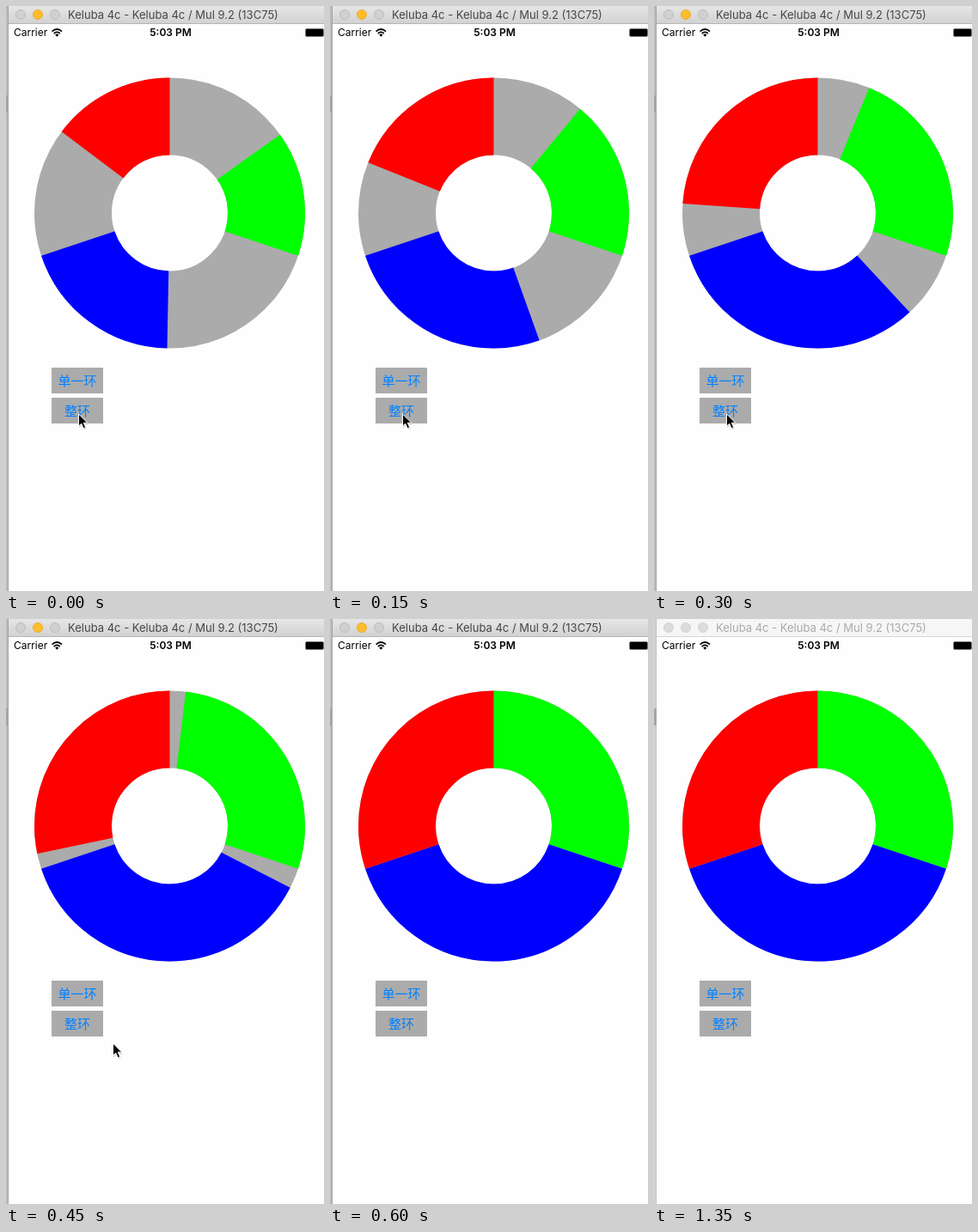
Animation of 370x681 px, one loop 1430 ms. Source, as an HTML page:

```html
<!DOCTYPE html>
<html lang="en">
<head>
<meta charset="utf-8">
<title>Ring chart</title>
<style>
  html, body { margin: 0; width: 100%; height: 100%; overflow: hidden; background: #fefefe; }
  svg { display: block; }
  text { font-family: Inter, Roboto, sans-serif; }
  .label { font: 15px "Noto Sans CJK SC", "Noto Sans CJK", sans-serif; fill: #0080ff; text-anchor: middle; }
  .ring circle { fill: none; stroke-width: 90; }
  .side { fill: #bcbcbc; }
  .edge { fill: #a2a2a2; }
  .bar { fill: url(#barFill); }
  .line { fill: #b6b6b6; }
  .title { font-size: 13px; fill: #464646; }
  .light { fill: #d0d0d0; stroke: #bcbcbc; }
  .amber { fill: #ffbd2e; stroke: #e9ab30; }
  .idle .side { fill: #d3d3d3; }
  .idle .edge { fill: #bdbdbd; }
  .idle .bar { fill: #f6f6f6; }
  .idle .line { fill: #d6d6d6; }
  .idle .title { fill: #a9a9a9; }
  .idle .light { fill: #dcdcdc; stroke: #d2d2d2; }
</style>
</head>
<body>
<svg id="stage" width="370" height="681" viewBox="0 0 370 681">
  <defs>
    <linearGradient id="barFill" x2="0" y2="1">
      <stop stop-color="#e6e6e6"/>
      <stop offset="1" stop-color="#d2d2d2"/>
    </linearGradient>
  </defs>

  <rect width="370" height="681" fill="#fefefe"/>
  <rect class="side" width="2" height="681"/>
  <rect class="edge" x="2" width="1" height="681"/>
  <rect y="104" width="3" height="20" fill="#a6a6a6"/>

  <rect class="bar" x="3" width="367" height="20"/>
  <rect class="line" x="3" y="20" width="367" height="1"/>
  <circle class="light" cx="17" cy="10" r="5.5"/>
  <circle class="light amber" id="amber" cx="37" cy="10" r="5.5"/>
  <circle class="light" cx="57" cy="10" r="5.5"/>
  <text class="title" x="72" y="15">Keluba 4c - Keluba 4c / Mul 9.2 (13C75)</text>

  <text x="9" y="35" font-size="12">Carrier</text>
  <g fill="none" stroke="#000" stroke-width="1.7">
    <path d="M53.6 29.6Q59.3 24.4 65 29.6"/>
    <path d="M55.8 32Q59.3 28.8 62.8 32"/>
  </g>
  <path d="M57.2 33.4Q59.3 31.7 61.4 33.4L59.3 35.7Z"/>
  <text x="191.5" y="35" font-size="12" font-weight="600" text-anchor="middle">5:03 PM</text>
  <rect x="348.5" y="26.5" width="21" height="9" rx="1.5" fill="#000" stroke="#777"/>

  <g class="ring" transform="translate(190.5 241) rotate(-90)">
    <circle r="112.5" stroke="#ababab"/>
    <g id="arcs"></g>
  </g>

  <rect x="53" y="421" width="60" height="30" fill="#ababab"/>
  <text class="label" lang="zh-CN" x="83" y="442">单一环</text>
  <rect x="53" y="456" width="60" height="30" fill="#ababab"/>
  <text class="label" lang="zh-CN" x="83" y="477">整环</text>

  <g id="cursor">
    <path d="M1 2V17L4.5 14L7 19L10 17.6L7.8 13H12.4Z" fill="#000" opacity=".14"/>
    <path d="M.5 .5V14.6L3.7 11.7L6.1 17.2L8.7 16L6.3 10.7H10.8Z"
          fill="#000" stroke="#fff" stroke-width="1"/>
  </g>
</svg>
<script>
  const LOOP = 1430, IDLE_AT = 1350;
  const byId = id => document.getElementById(id);

  // Each arc grows backwards from its end; values are shares of the ring.
  const arcs = [
    { color: '#0f0', end: .3, span: .3 },
    { color: '#00f', end: .7, span: .4 },
    { color: '#f00', end: 1, span: .3 }
  ];
  const fill = [[0, .4917], [150, .633], [300, .796], [450, .938], [515, 1]];
  const pointer = [[0, 84, 474.5], [450, 124, 493.5], [600]];

  for (const arc of arcs) {
    arc.el = document.createElementNS('http://www.w3.org/2000/svg', 'circle');
    arc.el.setAttribute('r', 112.5);
    arc.el.setAttribute('pathLength', 360);
    arc.el.setAttribute('stroke', arc.color);
    byId('arcs').append(arc.el);
  }

  function progress(t) {
    const i = fill.findIndex(k => k[0] > t);
    if (i < 0) return 1;
    const [t0, a] = fill[i - 1], [t1, b] = fill[i];
    return a + (b - a) * (t - t0) / (t1 - t0);
  }

  // Share of the ring to degrees, stepping along four cubic Bezier quarters.
  function angle(share) {
    const K = .5523, quarter = Math.floor(share * 4);
    const u = share * 4 - quarter, v = 1 - u;
    const x = v ** 3 + 3 * v * v * u + 3 * v * u * u * K;
    const y = u ** 3 + 3 * u * u * v + 3 * u * v * v * K;
    return quarter * 90 + Math.atan2(y, x) * 180 / Math.PI;
  }

  function draw(t) {
    const p = progress(t);
    for (const { el, end, span } of arcs) {
      const from = angle(end - span * p);
      el.setAttribute('stroke-dasharray', `0 ${from} ${angle(end) - from} 360`);
    }

    const [, x, y] = pointer.filter(k => k[0] <= t).pop();
    const cursor = byId('cursor');
    cursor.setAttribute('visibility', x ? 'visible' : 'hidden');
    if (x) cursor.setAttribute('transform', `translate(${x} ${y})`);

    const idle = t >= IDLE_AT;
    byId('stage').classList.toggle('idle', idle);
    byId('amber').classList.toggle('amber', !idle);
  }

  const start = performance.now();
  function tick() {
    draw((performance.now() - start) % LOOP);
    requestAnimationFrame(tick);
  }
  tick();
</script>
</body>
</html>
```
